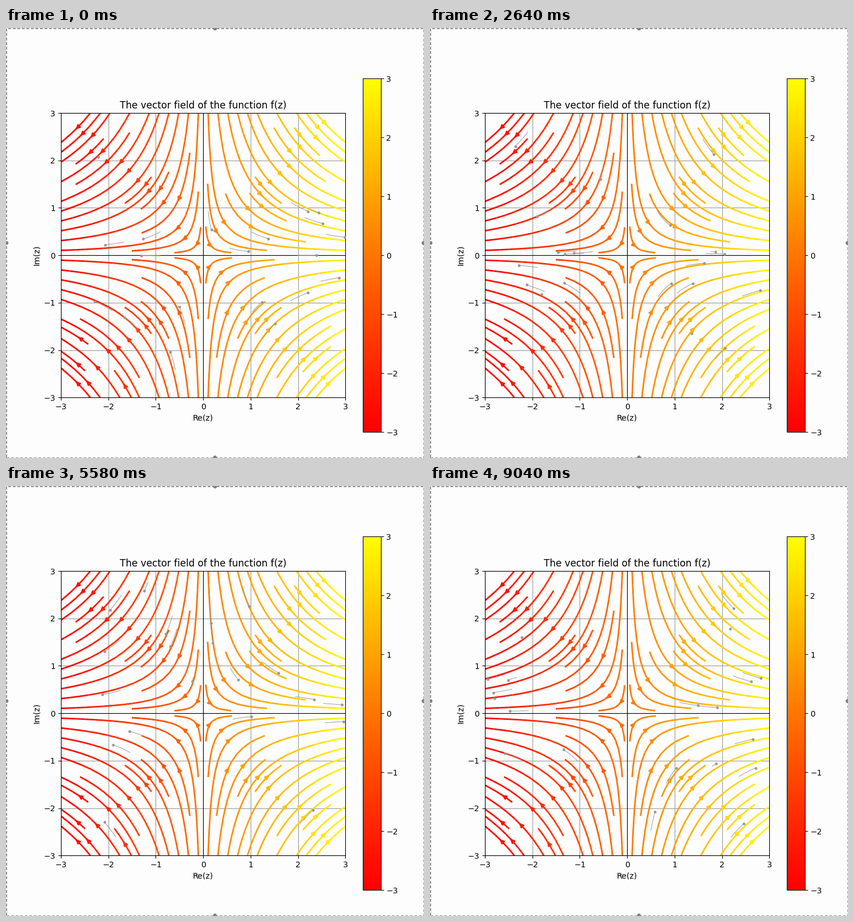
These frames come from a looping animation (738 by 759 pixels, 9.14 s). A matplotlib script:

```python
import numpy as np
import matplotlib.pyplot as plt
from matplotlib.animation import FuncAnimation
from matplotlib.collections import LineCollection
from matplotlib.colors import LinearSegmentedColormap
from matplotlib.lines import Line2D
from matplotlib.patches import Circle, Rectangle

W, H, DPI = 738, 759, 100
LOOP, TICK = 9140, 20
LIM = 3
COUNT, STEPS, WARMUP = 20, 68, 25
STEP, TAIL = 0.1, 4
PAPER, GRAY, FRAME = "#fdfdfd", "#999999", "#808080"

plt.rcParams.update({"font.family": "DejaVu Sans", "font.size": 10.13})
fig = plt.figure(figsize=(W / DPI, H / DPI), dpi=DPI, facecolor=PAPER)


def place(left, top, width, height):
    """Add axes whose box is given in pixels from the top left corner."""
    return fig.add_axes([left / W, 1 - (top + height) / H, width / W, height / H])


def plot_box():
    ax = place(97, 150, 502.4, 502.4)
    ax.set(xlim=(-LIM, LIM), ylim=(-LIM, LIM))
    return ax


def draw_scene():
    ax = plot_box()
    ax.set_facecolor(PAPER)
    ax.set_title("The vector field of the function f(z)")
    ax.set_xlabel("Re(z)")
    ax.set_ylabel("Im(z)")
    ax.grid(color=GRAY, lw=0.8)
    ax.axhline(0, color="black", lw=0.8)
    ax.axvline(0, color="black", lw=0.8)

    axis = np.linspace(-LIM, LIM, 20)
    x, y = np.meshgrid(axis, axis)
    heat = LinearSegmentedColormap.from_list("heat", ["red", "yellow"], gamma=1.12)
    flow = ax.streamplot(x, y, x, -y, color=x, cmap=heat, linewidth=2,
                         norm=plt.Normalize(-LIM, LIM))
    ax.set(xlim=(-LIM, LIM), ylim=(-LIM, LIM))
    fig.colorbar(flow.lines, cax=place(630.4, 89.1, 31.2, 624.2),
                 ticks=range(-LIM, LIM + 1))

    # dashed selection frame with a handle on each side
    fig.add_artist(Rectangle((0.5, 0.5), W - 1, H - 1, transform=None, fill=False,
                             ec=FRAME, lw=1.2, ls=(0, (3, 1.8))))
    for spot in [(W / 2, 1), (W / 2, H - 1), (1, H / 2), (W - 1, H / 2)]:
        fig.add_artist(Circle(spot, 2.6, transform=None, color=FRAME))


def drift(p):
    """One step along the unit field of f(z) = conj(z)."""
    return p + STEP * np.array([p[0], -p[1]]) / np.hypot(*p)


def simulate():
    """Tails of all particles at each step; one that leaves is born again."""
    rng = np.random.default_rng(7)

    def born():
        return [rng.uniform(-LIM, LIM, 2)]

    tails = [born() for _ in range(COUNT)]
    states = []
    for _ in range(WARMUP + STEPS):
        for i, tail in enumerate(tails):
            head = drift(tail[-1])
            inside = np.abs(head).max() <= LIM
            tails[i] = (tail + [head])[-TAIL - 1:] if inside else born()
        states.append([np.array(tail) for tail in tails])
    return states[WARMUP:]


# The scene never changes, so it is rendered once and reused as a backdrop.
draw_scene()
fig.canvas.draw()
backdrop = np.array(fig.canvas.buffer_rgba())
fig.clear()
fig.figimage(backdrop, zorder=-1)

states = simulate()
layer = plot_box()
layer.axis("off")
trails = layer.add_collection(LineCollection([], colors=GRAY, linewidths=0.7))
dots = layer.add_line(Line2D([], [], ls="", marker="o", ms=3.5, mew=0, color=GRAY))


def step_at(ms):
    """Steps come quickly at first, then one every 140 ms."""
    if ms < 240:
        return sum(ms >= t for t in (20, 120, 220))
    return (ms - 80) // 140 + 3


def update(frame):
    tails = states[step_at(frame * TICK)]
    trails.set_segments([tail for tail in tails if len(tail) > 1])
    dots.set_data(*np.array([tail[-1] for tail in tails]).T)
    return trails, dots


anim = FuncAnimation(fig, update, frames=LOOP // TICK, interval=TICK,
                     repeat=True, repeat_delay=0, cache_frame_data=False)
plt.show()
```
